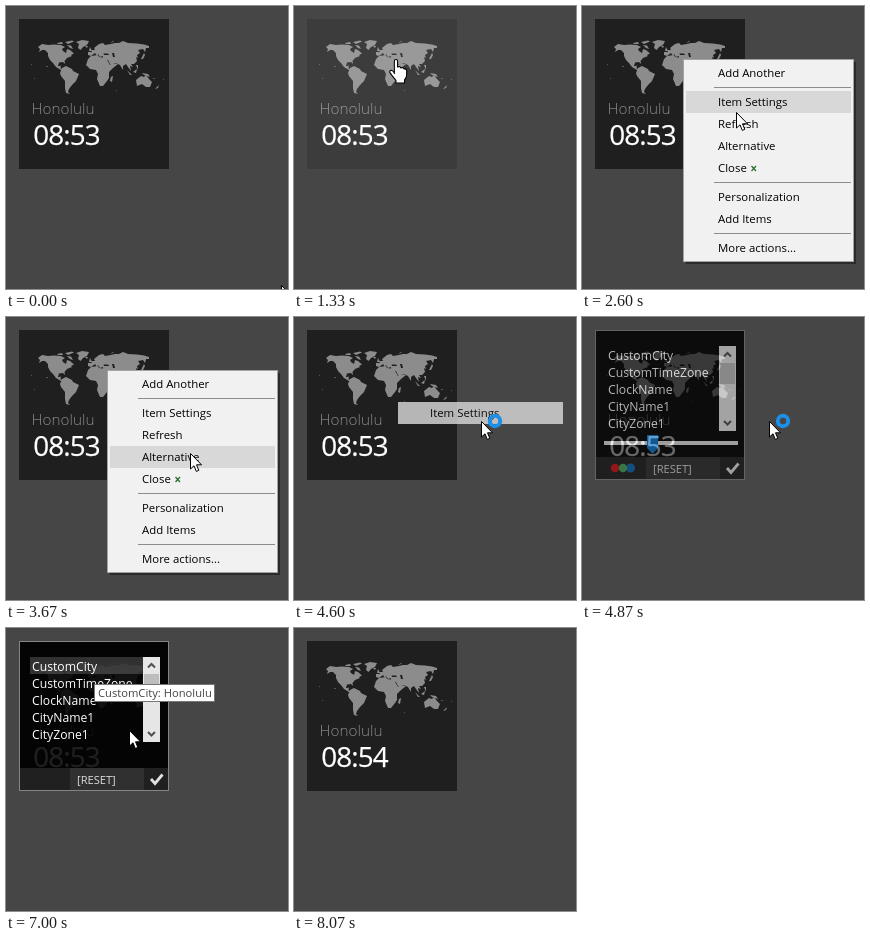
Write an HTML page that moves like this. It is 282 px wide and 283 px high and loops after 8740 ms.

```html
<!DOCTYPE html>
<html lang="en">
<head>
<meta charset="utf-8">
<title>World clock tile</title>
<style>
  html, body { margin: 0; width: 100%; height: 100%; overflow: hidden; background: #464646; }
  svg { display: block; width: 282px; height: 283px; font-family: "Open Sans", "Noto Sans", sans-serif; }
  #tile { fill: #1f1f1f; }
  #map { fill: #8c8c8c; fill-rule: evenodd; }
  .hover #tile { fill: #3c3c3c; }
  .hover #map { fill: #999; }
  #city { font-size: 15.3px; font-weight: 300; fill: #8c8c8c; }
  #clock { font-size: 27.8px; letter-spacing: -.9px; fill: #fff; stroke: #fff; stroke-width: .25; }
  .hover #city { fill: #999; }
  #menu text, #chosen text { font-size: 11.4px; fill: #000; }
  #menu line { stroke: #8c8c8c; }
  .bar { fill: #d8d8d8; }
  #list text { font-size: 12.2px; fill: #fff; }
  #reset { font-size: 11.1px; fill: #ddd; }
  #hint text { font-size: 11.2px; fill: #444; }
  .chevron { fill: none; stroke: #505050; stroke-width: 2; }
  .pointer { fill: #fff; stroke: #000; stroke-linejoin: round; }
</style>
</head>
<body>
<svg viewBox="0 0 282 283">
  <rect width="282" height="283" fill="#464646"/>

  <g id="widget">
    <rect id="tile" x="13" y="13" width="150" height="150"/>
    <g id="map">
      <!-- Americas -->
      <path d="M32 41L36 38 42 39 48 38.5 55 39 59 41 56 43 57 45 60 47 61 43 64 44 68 47.5 65 49 66 50 61 52 58.5 55 59 58 57 56 53 56.5 52 60 54 60 55 59 54.5 62 57 64 55 64 50 61 47 57 44 54 42 50 42 47 39 44 36 44 33 46 34 43z"/>
      <path d="M51 37L56 36 57 38 52 38zM59 36L66 34.5 68 35.5 62 38zM61 39L65 39.5 67 43 64 42zM70 36L76 34 83 35 81 39 77 41 74.5 44 72 42 73 38z"/>
      <path d="M56 62L60 60 66 63 67 65 73 68 70 75 66 79 63 83 62 86 64 88 60 87 59 82 59 75 55 70 54 67z"/>
      <!-- Africa -->
      <path d="M82 53L85 50 92 49 93 51 100 52 104 59 108 59 107 62 103 66 103 72 101 75 97 80 94 80 91 73 92 68 90 64 84 63 80 59zM105 71L107 70 106 76 104 75z"/>
      <!-- Eurasia with the Black and Caspian seas cut out -->
      <path d="M82 49L82 46 86 46 85 44 89 44 88 42 93 38 97 37 99 39 105 38 109 37 113 37 117 35 122 37 131 37.5 138 38.5 143 40 143 42 140 42 139 46 137 43 132 44 134 47 131 49 132 52 130 51 131 55 128 58 125 58 127 61 124 60 125 65 122 61 120 58 117 60 117 64 114 59 110 57 107 57 112 58 107 62 104 58 102 54 97 53 97 50 94 51 92 48 91 50 89 47 85 50z
        M97.5 47.5L102 47.5 103 49 98 49zM106 47L108 47 109 51 107 51z"/>
      <path d="M83 45L84 41 86 45zM79 40L82 40 81 42zM104 37L108 34.5 107 36zM135 53L138 47 139 49 137 53z"/>
      <!-- Oceania -->
      <path d="M121 64L126 69 124 69zM127 66L131 63 130 67zM130 59L132 59 132 64zM136 67L142 68 144 71 138 69z"/>
      <path d="M130 74L135 70 138 71 140 69 143 73 146 76 144 81 140 81 136 78 131 80zM149 83L153 79 152 82z"/>
      <path opacity=".5" d="M25 58h1v1h-1zM40 60h2v1h-2zM28 72h1v1h-1zM147 72h2v1h-2zM157 73h1v1h-1zM110 84h1v1h-1z"/>
    </g>
    <text id="city" x="25.5" y="108">Honolulu</text>
    <text id="clock" x="27.2" y="138.7">08:53</text>
  </g>

  <g id="menu">
    <rect x="104" y="56" width="170" height="202" fill="#000" opacity=".38"/>
    <rect x="101.5" y="53.5" width="170" height="202" fill="#f1f1f1" stroke="#a3a3a3"/>
    <rect id="row" class="bar" x="104" width="165" height="22"/>
    <line x1="132" x2="269" y1="81.5" y2="81.5"/>
    <line x1="132" x2="269" y1="176.5" y2="176.5"/>
    <line x1="132" x2="269" y1="227.5" y2="227.5"/>
    <text x="136" y="71">Add Another</text>
    <text x="136" y="100">Item Settings</text>
    <text x="136" y="122">Refresh</text>
    <text x="136" y="144">Alternative</text>
    <text x="136" y="166">Close</text>
    <path d="M169.5 160l4.5 5m0-5l-4.5 5" stroke="#276b27" stroke-width="1.2"/>
    <text x="136" y="195">Personalization</text>
    <text x="136" y="217">Add Items</text>
    <text x="136" y="246">More actions...</text>
  </g>

  <g id="chosen">
    <rect class="bar" x="104" y="85" width="165" height="22"/>
    <text x="136" y="100">Item Settings</text>
  </g>

  <g id="panel">
    <rect x="13" y="13" width="150" height="150" opacity=".88"/>
    <rect x="13.5" y="13.5" width="149" height="149" fill="none" stroke="#858585"/>
    <rect id="selected" x="24" y="29" width="113" height="17" fill="#fff" opacity=".18"/>
    <g id="list">
      <text x="26" y="42.5">CustomCity</text>
      <text x="26" y="59.5">CustomTimeZone</text>
      <text x="26" y="76.5">ClockName</text>
      <text x="26" y="93.5">CityName1</text>
      <text x="26" y="110.5">CityZone1</text>
    </g>
    <rect x="137" y="29" width="17" height="85" fill="#e6e6e6"/>
    <rect x="138" y="46" width="15" height="21" fill="#bdbdbd"/>
    <path class="chevron" d="M142 39.5l3.5-3.5 3.5 3.5M142 104l3.5 3.5 3.5-3.5"/>
    <g id="slider">
      <rect x="22" y="124" width="134" height="4" fill="#dedede"/>
      <path d="M65 118h11v13l-5.5 6-5.5-6z" fill="#0f74c8"/>
    </g>
    <rect x="14" y="140" width="148" height="22" fill="#202020"/>
    <rect x="64" y="140" width="74" height="22" fill="#303030"/>
    <g id="dots">
      <circle cx="33" cy="151" r="4.2" fill="#d01216"/>
      <circle cx="48.5" cy="151" r="4.5" fill="#0f66b0"/>
      <circle cx="41" cy="151" r="4.2" fill="#45a352"/>
    </g>
    <text id="reset" x="71" y="155.5">[RESET]</text>
    <path d="M145 151l4 4.5 7.5-9" fill="none" stroke="#e0e0e0" stroke-width="2.8"/>
  </g>

  <g id="hint">
    <rect x="88.5" y="56.5" width="120" height="17" fill="#fff" stroke="#767676"/>
    <text x="92" y="69">CustomCity: Honolulu</text>
  </g>

  <g id="cursor">
    <path id="arrow" class="pointer" d="M.5 .5V16L4 12.8 6.3 18.4 8.8 17.3 6.5 11.8H11.5z"/>
    <path id="hand" class="pointer" transform="translate(-6) scale(1.07)" d="M5 14V2Q5 .5 6.5 .5T8 2V7.5Q10.8 6.5 11 8.3 13.6 7.5 14 9.3 16.5 9 16.5 11V15Q16.5 17.5 14.5 19.5V22.5H6.5V20Q3 16 .7 12.5 .5 10.5 2.2 10.6 3.8 11 5 13"/>
    <circle id="busy" cx="14" cy="0" r="5.2" fill="none" stroke="#1c8fe6" stroke-width="4"/>
  </g>
</svg>
<script>
  const LOOP = 8740, TICK = 1000 / 15;
  const el = id => document.getElementById(id);

  // Pointer hotspot: [tick, x, y]
  const path = [
    [0, 275, 279], [4, 232, 214], [9, 160, 112], [14, 118, 66], [17, 102, 54],
    [19, 102, 54], [20, 101, 53], [30, 101, 53], [34, 118, 74], [39, 154, 106],
    [44, 176, 132], [51, 185, 153], [53, 185, 153], [55, 184, 136], [60, 187, 104],
    [79, 187, 104], [83, 150, 70], [86, 105, 50], [89, 88, 42], [94, 88, 42],
    [95, 87, 40], [99, 87, 40], [104, 118, 92], [110, 150, 149], [114, 150, 149],
    [121, 197, 290]
  ];
  const rowTops = [56, 85, 107, 129, 151];

  function pointerAt(tick) {
    const i = path.findIndex(p => p[0] > tick);
    if (i < 0) return path[path.length - 1].slice(1);
    const [a, x0, y0] = path[i - 1], [b, x1, y1] = path[i];
    const k = (tick - a) / (b - a);
    return [Math.round(x0 + (x1 - x0) * k), Math.round(y0 + (y1 - y0) * k)];
  }

  const clamp = v => Math.max(0, Math.min(1, v));
  const fade = (id, v) => el(id).setAttribute("opacity", clamp(v));
  const show = (id, on) => { el(id).style.display = on ? "" : "none"; };

  function draw(ms) {
    const tick = Math.floor((ms % LOOP + 4) / TICK);
    const between = (a, b) => tick >= a && tick < b;
    const [x, y] = pointerAt(tick);
    const inTile = x >= 13 && x < 163 && y >= 13 && y < 163;
    const hover = inTile && !between(24, 115);

    el("widget").setAttribute("class", hover ? "hover" : "");
    el("clock").textContent = tick < 115 ? "08:53" : "08:54";

    const rowTop = rowTops.find(top => y >= top && y < top + 22);
    show("menu", between(24, 69));
    fade("menu", (tick - 23) / 3);
    show("row", rowTop !== undefined);
    el("row").setAttribute("y", rowTop || 0);

    show("chosen", between(69, 73));
    fade("chosen", 0.82 - (tick - 69) * 0.21);

    show("panel", between(72, 115));
    fade("panel", (tick - 71) / 3);
    show("selected", tick >= 91);
    show("slider", tick < 97);
    show("dots", tick < 97);
    show("hint", between(97, 115));

    el("cursor").setAttribute("transform", `translate(${x} ${y})`);
    show("cursor", tick < 121);
    show("hand", hover);
    show("arrow", !hover);
    show("busy", between(69, 74));
  }

  const start = performance.now();
  function frame() {
    draw(performance.now() - start);
    requestAnimationFrame(frame);
  }
  frame();
</script>
</body>
</html>
```
